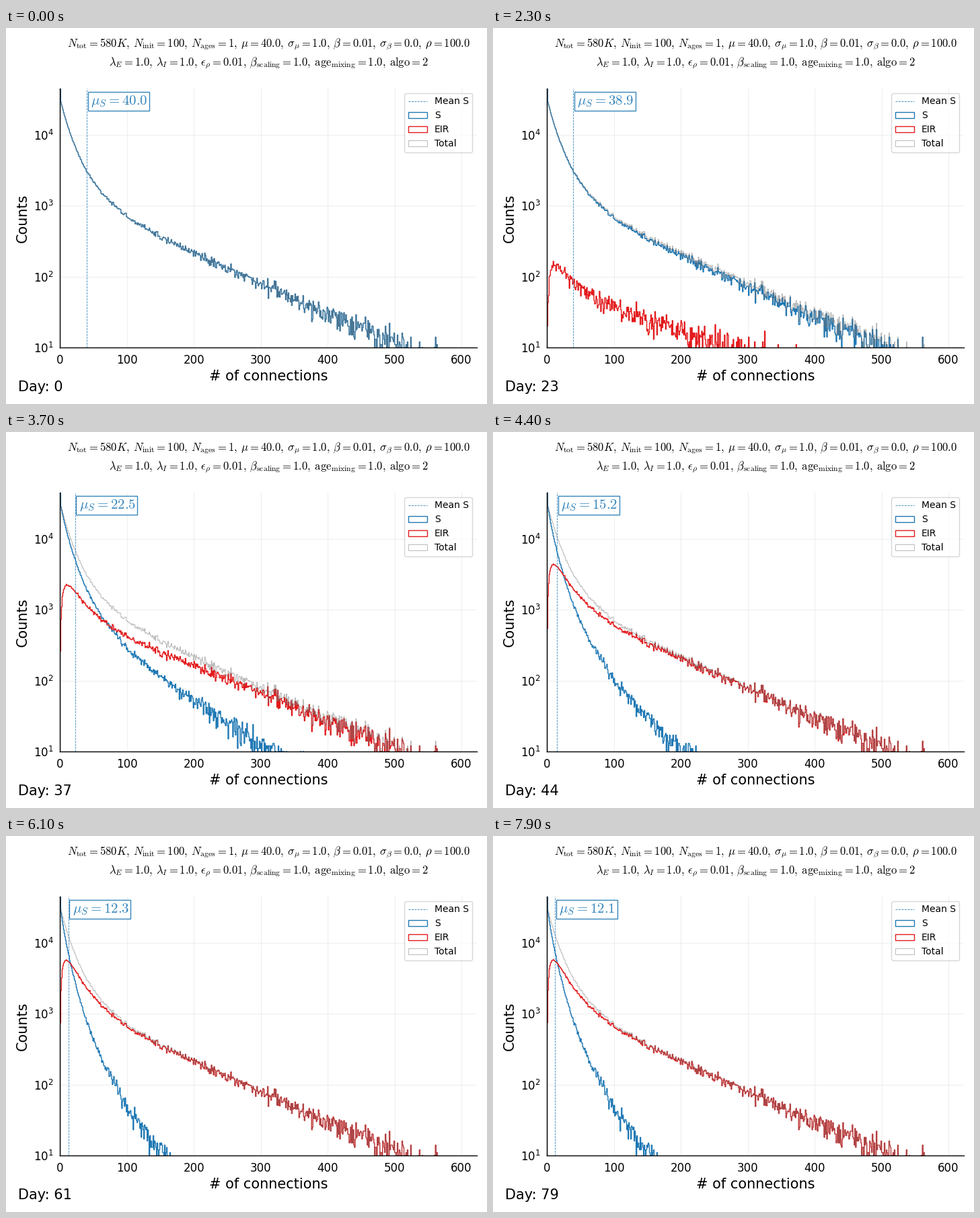
Recreate the animation shown at these times as a matplotlib script. Size 715 by 559 pixels, loop 8000 ms.

```python
import numpy as np
import matplotlib.pyplot as plt
from matplotlib.animation import FuncAnimation
from matplotlib.lines import Line2D
from matplotlib.patches import Patch, Rectangle

W, H, DPI = 715, 559, 100
DAYS, STEP = 80, 100
LEFT, TOP, WIDTH, HEIGHT = 80.4, 89.9, 620, 385
X_MAX, Y_MIN, Y_MAX = 623.5, 10, 4.5e4
BLUE, RED, GREY = "#1f78b4", "#e31a1c", (0.45, 0.45, 0.45, 0.5)

plt.rcParams["font.family"] = "DejaVu Sans"


def logistic(x):
    return 1 / (1 + np.exp(-x))


# Contact numbers: exponential tail with an excess of weakly connected people
rng = np.random.default_rng(4)
k = np.arange(624)
edges = np.arange(k.size + 1)
log_count = 3.16 - 0.0042 * k + 1.33 * np.exp(-k / 40) + 0.22 * np.exp(-4 * k)
total = rng.poisson(10 ** log_count).astype(float)
spread = rng.normal(size=k.size)
exposure = (k + 0.2) / (1 + k / 6) ** 0.33


def susceptible(day):
    """Susceptible people per number of connections."""
    share = np.exp(-0.068 * logistic(0.23 * (day - 40)) * exposure)
    count = total * share + np.sqrt(total * share * (1 - share)) * spread
    return np.clip(np.round(count), 0, total)


def mean_degree(day):
    u = day - 29
    return 12.1 + 27.9 * logistic(1.52 - 0.2712 * u + 0.00203 * u * u)


def visible(count):
    return np.maximum(count, 0.5)


fig = plt.figure(figsize=(W / DPI, H / DPI), dpi=DPI, facecolor="white")
ax = fig.add_axes([LEFT / W, 1 - (TOP + HEIGHT) / H, WIDTH / W, HEIGHT / H])
ax.set_yscale("log")
ax.spines[["top", "right"]].set_visible(False)
ax.spines[["left", "bottom"]].set_linewidth(1)
ax.tick_params(which="major", length=0, pad=7, labelsize=12)
ax.set_axisbelow(True)
ax.grid(color="#b0b0b0", alpha=0.2, lw=0.8)
ax.set_xlabel("# of connections", fontsize=15)
ax.set_ylabel("Counts", fontsize=15)

s_hist = ax.stairs(visible(total), edges, color=BLUE, lw=1, zorder=2)
e_hist = ax.stairs(visible(total * 0), edges, color=RED, lw=1, zorder=2.1)
ax.stairs(visible(total), edges, color=GREY, lw=0.7, zorder=2.2)
dashed = dict(color=BLUE, lw=0.6, ls="--", alpha=0.9)
mean_line = ax.axvline(40, zorder=3, **dashed)
ax.set_xlim(0, X_MAX)
ax.set_ylim(Y_MIN, Y_MAX)
ax.minorticks_off()


def box(color, label, lw):
    return Patch(fill=False, edgecolor=color, lw=lw, label=label)


ax.legend(handles=[Line2D([], [], label="Mean S", **dashed),
                   box(BLUE, "S", 1), box(RED, "EIR", 1), box(GREY, "Total", 0.7)],
          loc="upper right", fontsize=10)

# Overlay in pixel coordinates for the heading, the day and the mean tag
page = fig.add_axes([0, 0, 1, 1])
page.set(xlim=(0, W), ylim=(H, 0))
page.axis("off")


def write(x, y, text, size, **kw):
    return page.text(x, y, text, fontsize=size, va="baseline",
                     math_fontfamily="cm", **kw)


heading = [
    [r"N_{\mathrm{tot}}=580K", r"N_{\mathrm{init}}=100", r"N_{\mathrm{ages}}=1",
     r"\mu=40.0", r"\sigma_{\mu}=1.0", r"\beta=0.01", r"\sigma_{\beta}=0.0",
     r"\rho=100.0"],
    [r"\lambda_{E}=1.0", r"\lambda_{I}=1.0", r"\epsilon_{\rho}=0.01",
     r"\beta_{\mathrm{scaling}}=1.0", r"\mathrm{age}_{\mathrm{mixing}}=1.0",
     r"\mathrm{algo}=2"],
]
for row, terms in enumerate(heading):
    write(LEFT + WIDTH / 2, 29 + 27 * row,
          "$" + r",\hspace{0.22}".join(terms) + "$", 12, ha="center")

day_text = write(18, 540, "", 15)
tag = page.add_patch(Rectangle((0, 94.9), 91, 28, facecolor="white",
                               edgecolor=BLUE, lw=1, alpha=0.9))
tag_text = write(0, 114, "", 15, color=BLUE, alpha=0.9)


def update(day):
    s = susceptible(day)
    s_hist.set_data(visible(s))
    e_hist.set_data(visible(total - s))
    mean = mean_degree(day)
    mean_line.set_xdata([mean, mean])
    x = LEFT + mean * WIDTH / X_MAX
    tag.set_x(x + 1.4)
    tag_text.set_x(x + 6)
    tag_text.set_text(rf"$\mu_{{S}}={mean:.1f}$")
    day_text.set_text(f"Day: {day}")
    return s_hist, e_hist, mean_line, tag, tag_text, day_text


anim = FuncAnimation(fig, update, frames=DAYS, interval=STEP, repeat=True,
                     repeat_delay=0, blit=False)
plt.show()
```
